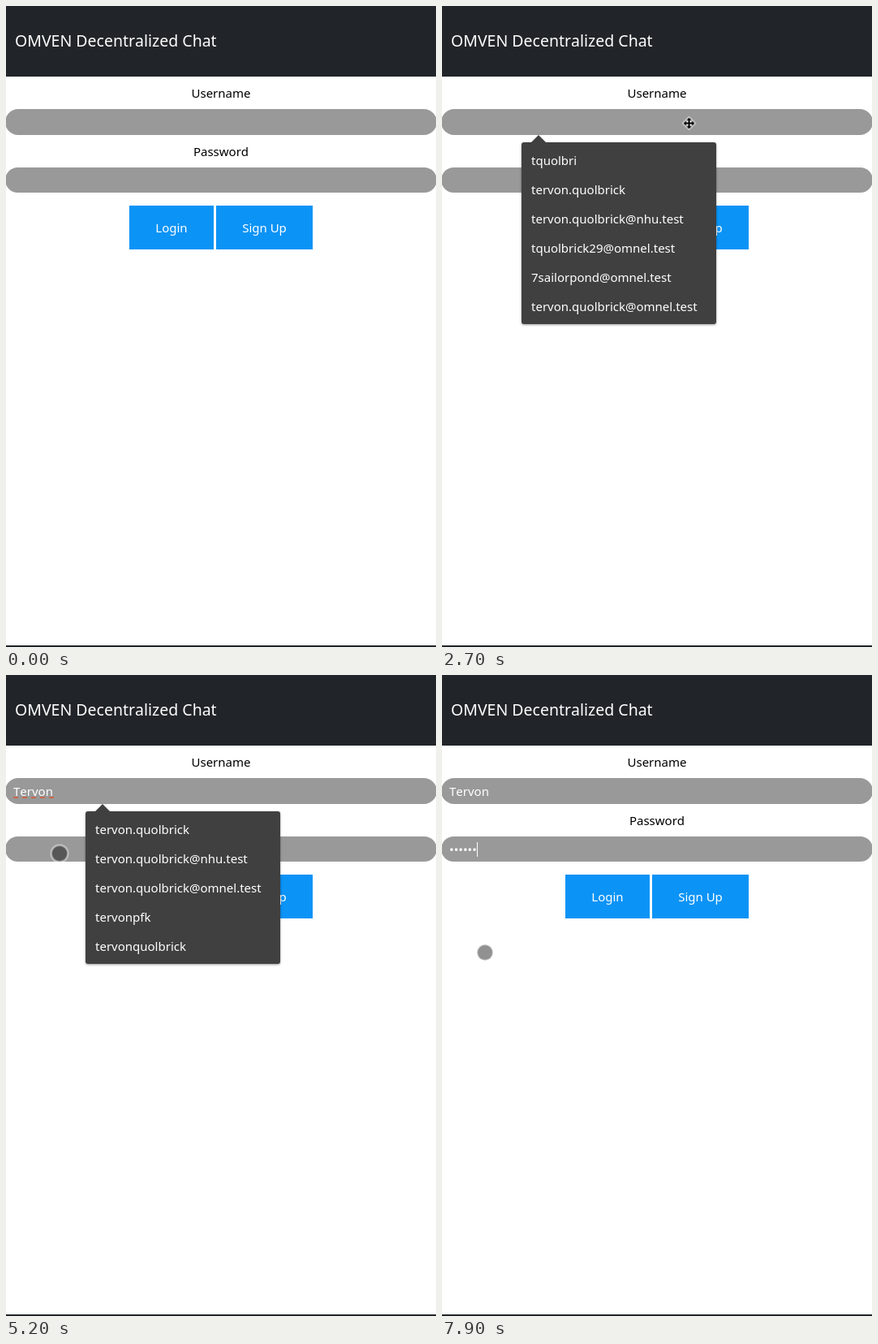
An HTML page for the animation above (8 s loop, 530 by 790 pixels).

```html
<!DOCTYPE html>
<html lang="en">
<head>
<meta charset="utf-8">
<title>Chat login</title>
<style>
* { box-sizing: border-box; }
html, body { margin: 0; width: 100%; height: 100%; overflow: hidden; background: #fff; }
body { position: relative; font: 15px/20px "Noto Sans", "Open Sans", sans-serif; color: #000; font-kerning: none; }
header, footer, label, .field, .button, .popup, .cursor, .typo { position: absolute; }

header { left: 0; top: 0; width: 530px; height: 87px; padding-left: 11px; background: #212529; color: #fff; font-size: 19.5px; line-height: 85px; white-space: nowrap; }
footer { left: 0; top: 788px; width: 530px; height: 2px; background: #212529; }
label { left: 0; width: 530px; text-align: center; }

.field { left: -1px; width: 532px; height: 32px; padding-left: 10px; border-radius: 16px; background: #999; color: #fff; display: flex; align-items: center; }
.field::after { content: ""; width: 1px; height: 18px; background: #fff; }
.field::before { content: ""; }
.button { top: 246px; height: 54px; background: #0b93f6; color: #fff; line-height: 54px; text-align: center; }

.popup { left: 98px; top: 168px; width: 240px; margin: 0; padding: 4px 12px; border-radius: 3px; background: #404040; color: #fff; list-style: none; line-height: 36px; white-space: nowrap; box-shadow: 0 1px 3px #0006; }
.popup::before { content: ""; position: absolute; left: 12px; top: -9px; border: solid transparent; border-width: 0 9px 9px; border-bottom-color: #404040; }

.typo { left: 9px; top: 150px; width: 50px; border-bottom: 2px dashed #c8694f; }
.cursor { left: 0; top: 0; }
.disc, .move { position: absolute; left: -11.5px; top: -11.5px; width: 23px; height: 23px; }
.disc { border-radius: 50%; border: 2px solid #ffffff70; background: #0000006e padding-box; }

/* One shared 8 s clock; everything but the pointer path switches hard. */
.user::before, .user::after, .pass::before, .pass::after,
.popup, .typo, .disc, .move { animation: 8s step-end -20ms infinite; }
.user::before { animation-name: type-user; }
.user::after { animation-name: caret-user; }
.pass::before { animation-name: type-pass; }
.pass::after { animation-name: caret-pass; }
.all { animation-name: list-all; }
.matches { animation-name: list-matches; }
.typo { animation-name: typo; }
.disc { animation-name: disc; }
.move { animation-name: move; }
.cursor { animation: path 8s linear -20ms infinite; }

@keyframes type-user {
  0% { content: ""; }
  36.25% { content: "T"; }
  38.75% { content: "Te"; }
  41.25% { content: "Ter"; }
  42.5% { content: "Terv"; }
  45% { content: "Tervo"; }
  46.25%, 100% { content: "Tervon"; }
}
@keyframes caret-user {
  0%, 30%, 52.5%, 65%, 100% { opacity: 0; }
  23.75%, 36.25%, 58.75% { opacity: 1; }
}
@keyframes type-pass {
  0% { content: ""; }
  96.25% { content: "••"; }
  97.5% { content: "••••"; }
  98.75%, 100% { content: "••••••"; }
}
@keyframes caret-pass {
  0%, 72.5%, 85% { opacity: 0; }
  67.5%, 78.75%, 91.25%, 100% { opacity: 1; }
}
@keyframes list-all {
  0%, 38.75%, 100% { opacity: 0; }
  31.25% { opacity: 1; }
}
@keyframes list-matches {
  0%, 67.5%, 100% { opacity: 0; }
  38.75% { opacity: 1; }
}
@keyframes typo {
  0%, 67.5%, 100% { opacity: 0; }
  65% { opacity: 1; }
}
@keyframes disc {
  0%, 31.25% { opacity: 0; }
  1.25%, 37.5%, 100% { opacity: 1; }
}
@keyframes move {
  0%, 37.5%, 100% { opacity: 0; }
  31.25% { opacity: 1; }
}
@keyframes path {
  0%, 1.25% { transform: translate(120px, 49px); }
  3.75% { transform: translate(35px, 150px); }
  6.25% { transform: translate(90px, 300px); }
  8.75% { transform: translate(200px, 324px); }
  11.25% { transform: translate(335px, 271px); }
  13.75% { transform: translate(280px, 270px); }
  16.25% { transform: translate(215px, 215px); }
  18.75% { transform: translate(290px, 158px); }
  20%, 56.25% { transform: translate(304.5px, 144.5px); }
  58.75% { transform: translate(325px, 110px); }
  60.5% { transform: translate(230px, 65px); }
  62.5% { transform: translate(80px, 150px); }
  64.75%, 71.25% { transform: translate(65.5px, 219.5px); }
  77.5%, 100% { transform: translate(52.5px, 341.5px); }
}
</style>
</head>
<body>
<header>OMVEN Decentralized Chat</header>
<label style="top:97px">Username</label>
<div class="field user" style="top:127px"></div>
<label style="top:169px">Password</label>
<div class="field pass" style="top:199px;height:31px"></div>
<div class="button" style="left:152px;width:104px">Login</div>
<div class="button" style="left:259px;width:119px">Sign Up</div>
<div class="typo"></div>

<ul class="popup all">
  <li>tquolbri</li>
  <li>tervon.quolbrick</li>
  <li>tervon.quolbrick@nhu.test</li>
  <li>tquolbrick29@omnel.test</li>
  <li>7sailorpond@omnel.test</li>
  <li>tervon.quolbrick@omnel.test</li>
</ul>
<ul class="popup matches">
  <li>tervon.quolbrick</li>
  <li>tervon.quolbrick@nhu.test</li>
  <li>tervon.quolbrick@omnel.test</li>
  <li>tervonpfk</li>
  <li>tervonquolbrick</li>
</ul>
<footer></footer>

<div class="cursor">
  <div class="disc"></div>
  <svg class="move" viewBox="-11 -11 23 23">
    <path d="M0-7 3.5-3.5H1V-1H3.5V-3.5L7 0 3.5 3.5V1H1V3.5H3.5L0 7-3.5 3.5H-1V1H-3.5V3.5L-7 0-3.5-3.5V-1H-1V-3.5H-3.5Z" fill="#000" stroke="#fff" stroke-width="2" paint-order="stroke"/>
  </svg>
</div>
</body>
</html>
```
